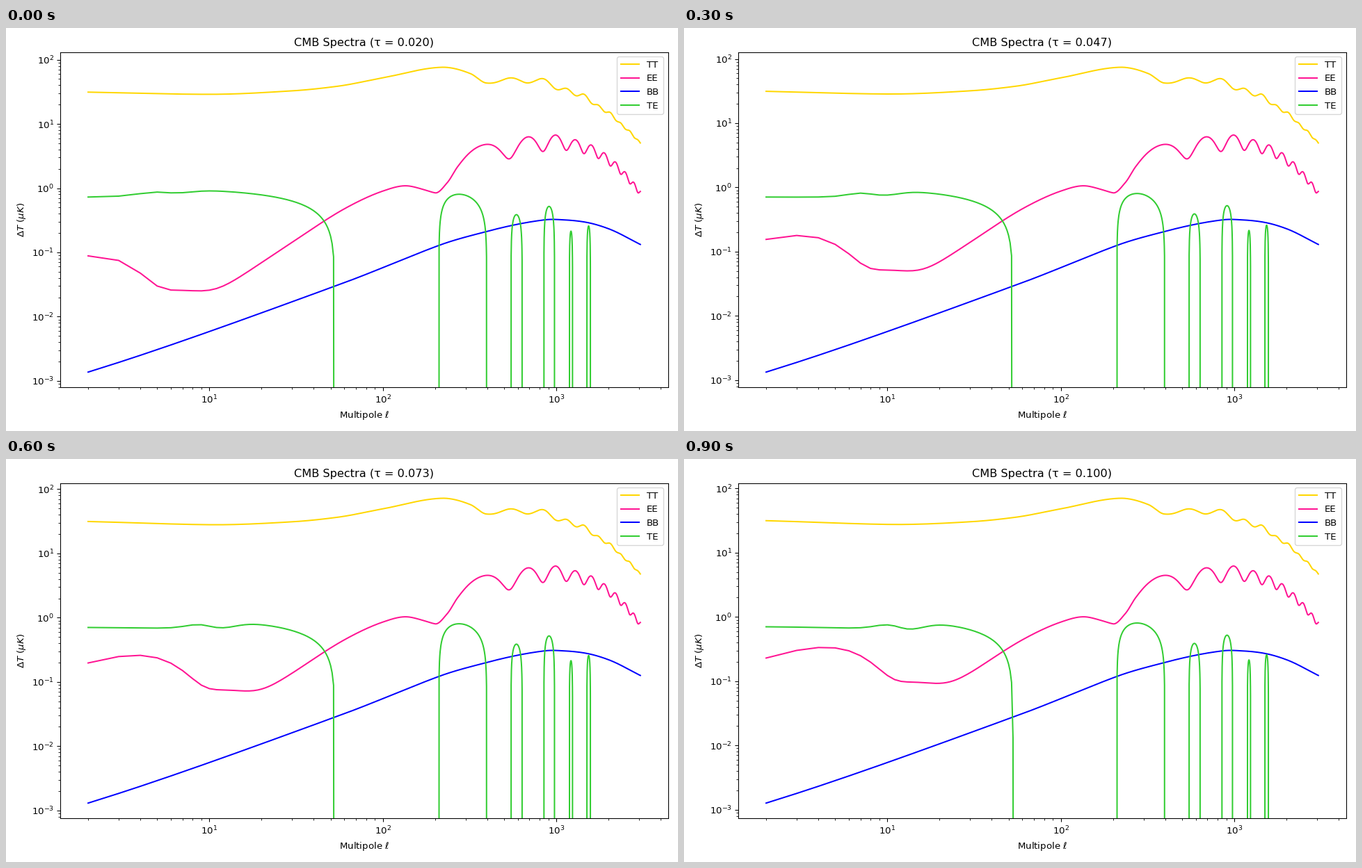
Write a matplotlib script that moves like this. It is 966 by 580 pixels and loops after 1000 ms.

```python
import numpy as np
import matplotlib.pyplot as plt
from matplotlib.animation import FuncAnimation

W, H, DPI = 966, 580, 96.6
N_FRAMES, INTERVAL = 10, 100
TAUS = np.linspace(0.02, 0.1, N_FRAMES)
ELL = np.arange(2, 3051)
ACOUSTIC_PERIOD = 302

# Key points (ell, log10 of value) of the slowly varying parts.
TT_TREND = [(2, 1.495), (10, 1.461), (30, 1.515), (55, 1.587), (100, 1.718),
            (220, 1.877), (320, 1.778), (395, 1.665), (546, 1.692), (697, 1.691),
            (848, 1.631), (1150, 1.532), (1452, 1.411), (2056, 1.142), (3050, 0.71)]
EE_TREND = [(2, -2.811), (10, -1.584), (30, -0.782), (60, -0.31), (100, -0.04),
            (138, 0.095), (165, 0.127), (200, 0.203), (235, 0.452), (270, 0.6),
            (386, 0.678), (688, 0.799), (990, 0.827), (1292, 0.753),
            (1594, 0.671), (2198, 0.405), (3050, -0.031)]
BB_DAMPING = [(2, 0), (60, 0), (211, 0.037), (400, -0.022), (860, -0.175),
              (1130, -0.296), (1500, -0.457), (2000, -0.68), (3050, -1.108)]
# Intervals of ell where TE is positive, with the peak value in each.
TE_LOBES = [(210.4, 397, 0.804), (548, 636, 0.387), (848, 977, 0.52),
            (1190, 1241, 0.214), (1500, 1573, 0.258)]


def trend(points):
    """Monotone cubic curve through the points, in log ell."""
    xs, ys = np.array(points, float).T
    xs, x = np.log10(xs), np.log10(ELL)
    h = np.diff(xs)
    d = np.diff(ys) / h
    slope = np.concatenate([d[:1], np.zeros(len(d) - 1), d[-1:]])
    same = d[:-1] * d[1:] > 0
    a, b = d[:-1][same], d[1:][same]
    w1 = (2 * h[1:] + h[:-1])[same]
    w2 = (h[1:] + 2 * h[:-1])[same]
    slope[1:-1][same] = (w1 + w2) / (w1 / a + w2 / b)
    i = np.clip(np.searchsorted(xs, x, side="right") - 1, 0, len(h) - 1)
    t = (x - xs[i]) / h[i]
    return (ys[i] * (1 + 2 * t) * (1 - t) ** 2 + ys[i + 1] * t * t * (3 - 2 * t)
            + h[i] * t * (1 - t) * (slope[i] * (1 - t) - slope[i + 1] * t))


def acoustic_phase(peak):
    return 2 * np.pi * (ELL - peak) / ACOUSTIC_PERIOD


def tt_base():
    phase = acoustic_phase(848)
    size = 0.08 * np.exp(-ELL / 1600) * (1 - np.exp(-(ELL / 450) ** 4))
    return 10 ** (trend(TT_TREND) + size * (np.cos(phase) + 0.5 * np.cos(phase / 2)))


def ee_base():
    depth = 0.77 * np.exp(-ELL / 2100)
    wave = (1 + depth * np.cos(acoustic_phase(386))) / (1 + depth)
    return 10 ** trend(EE_TREND) * np.sqrt(wave)


def bb_base():
    return 5.59e-4 * np.sqrt(ELL * (ELL + 1)) * 10 ** trend(BB_DAMPING)


def te_lobes():
    squared = np.zeros(len(ELL))
    for start, end, height in TE_LOBES:
        t = (1 / start - 1 / ELL) / (1 / start - 1 / end)
        squared = np.maximum(squared, height ** 2 * 4 * t * (1 - t))
    return squared


TT, EE, BB, LOBES = tt_base(), ee_base(), bb_base(), te_lobes()


def bump_scale(tau):
    """Multipoles in units of the reionization bump's position."""
    return ELL / (4.35 * (tau / 0.1) ** 0.458)


def ee_bump(tau):
    x = bump_scale(tau)
    main = x * np.exp((1 - x ** 2) / 2)
    tail = 0.27 * np.exp(-np.log(x / 3) ** 2 / 0.6)
    return 0.336 * (tau / 0.1) ** 0.83 * np.hypot(main, tail)


def te_curve(tau):
    x = bump_scale(tau)
    progress = (tau - TAUS[0]) / (TAUS[-1] - TAUS[0])
    zero = 52.87 + 0.17 * progress ** 3
    plateau = 1.1 * np.maximum(1 - ELL / zero, 0) ** 1.22
    rise = 1 / (1 + (3.9 / x) ** 9)
    ripple = 0.19 * np.exp(-((x - 2.3) / 0.35) ** 2 / 2)
    loss = 0.53 * (1 - rise) - ripple
    strength = (tau / 0.1) ** (0.4 * np.minimum(x / 3, 1) ** 2)
    squared = np.maximum(plateau * (1 - loss * strength), LOBES)
    return np.sqrt(np.maximum(squared, 1e-40))


def spectra(tau):
    delta = tau - TAUS[0]
    damping = np.exp(-delta)
    low_gain = np.exp(1.1 * delta * np.exp(-(ELL - 2) / 8))
    return {"TT": TT * damping * low_gain,
            "EE": np.hypot(EE * damping, ee_bump(tau)),
            "BB": BB * damping,
            "TE": te_curve(tau)}


def padded_limits(low, high):
    margin = (high / low) ** 0.05
    return low / margin, high * margin


# The small excess keeps the pixel size from rounding down.
fig, ax = plt.subplots(figsize=((W + 1e-6) / DPI, (H + 1e-6) / DPI), dpi=DPI)
ax.set_xscale("log")
ax.set_yscale("log")
ax.set_xlim(padded_limits(ELL[0], ELL[-1]))
ax.set_xlabel(r"Multipole $\ell$")
ax.set_ylabel(r"$\Delta T\ (\mu K)$")
title = ax.set_title("")
COLORS = {"TT": "gold", "EE": "deeppink", "BB": "blue", "TE": "limegreen"}
lines = {name: ax.plot([], [], color=color, label=name)[0]
         for name, color in COLORS.items()}
ax.legend(loc="upper right")


def update(step):
    tau = TAUS[step]
    curves = spectra(tau)
    for name, values in curves.items():
        lines[name].set_data(ELL, values)
    ax.set_ylim(padded_limits(curves["BB"].min(), curves["TT"].max()))
    title.set_text(f"CMB Spectra (τ = {tau:.3f})")
    return [*lines.values(), title]


update(0)
fig.tight_layout()
anim = FuncAnimation(fig, update, frames=N_FRAMES, interval=INTERVAL,
                     repeat=True, repeat_delay=0, blit=False)
plt.show()
```
